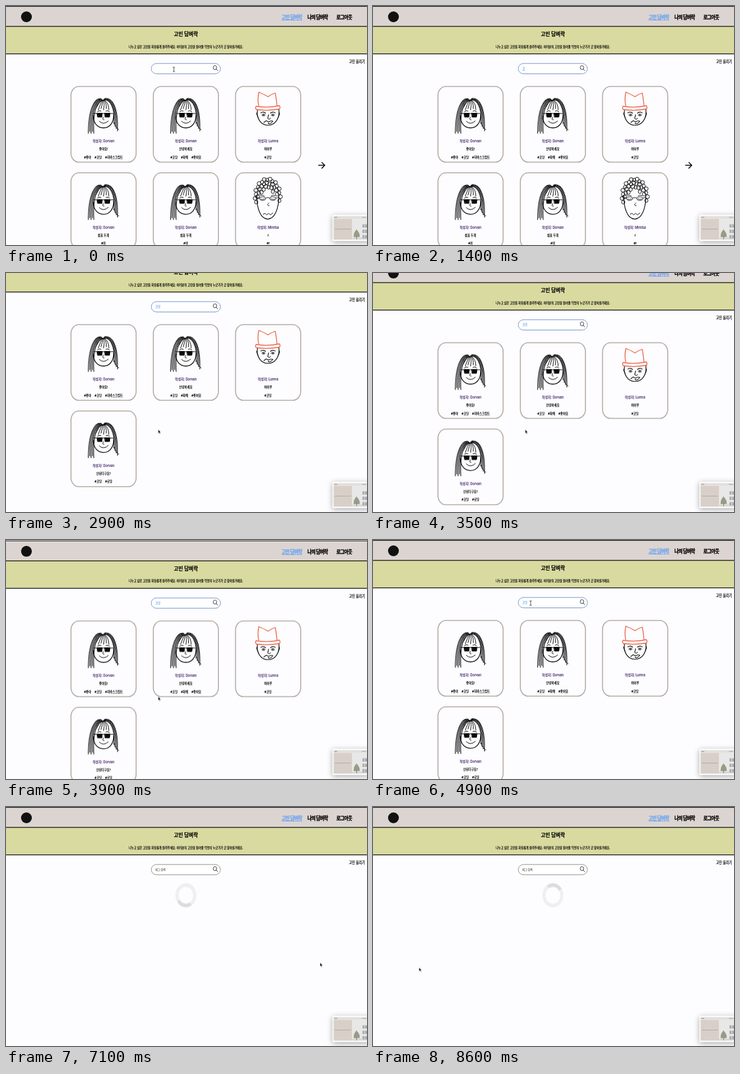
Recreate the animation shown at these times as an HTML page. Size 600 px wide and 398 px high, loop 8700 ms.

```html
<!DOCTYPE html>
<html lang="ko">
<head>
<meta charset="utf-8">
<title>고민 담벼락</title>
<style>
  html, body { margin: 0; width: 600px; height: 398px; overflow: hidden; background: #fdfcfe; }
  svg { display: block; }
  text { font-family: "Noto Sans", "Noto Sans CJK KR", sans-serif; font-weight: 500; white-space: pre; }
  .bold { font-weight: 700; }
  .heavy { font-weight: 900; letter-spacing: -0.8px; }
  .shadow { filter: drop-shadow(0 2px 5px #0005); }
</style>
</head>
<body>
<script>
const LOOP = 8700;
const SQUEEZE = 0.87; // the page is shown narrower than it was laid out
const COLS = [108, 244.8, 381.5];
const INK = '#0b0b0b';

function add(parent, tag, attrs = {}) {
  const el = document.createElementNS('http://www.w3.org/2000/svg', tag);
  for (const key in attrs) el.setAttribute(key, attrs[key]);
  parent.append(el);
  return el;
}
const group = (parent, x = 0, y = 0) => add(parent, 'g', { transform: `translate(${x} ${y})` });
const rect = (parent, x, y, width, height, fill, attrs) =>
  add(parent, 'rect', { x, y, width, height, fill, ...attrs });
const line = (parent, d, width = 1.1, stroke = INK, fill = 'none') =>
  add(parent, 'path', { d, stroke, fill, 'stroke-width': width, 'stroke-linecap': 'round', 'stroke-linejoin': 'round' });
const oval = (parent, cx, cy, rx, ry, attrs) =>
  add(parent, 'ellipse', { cx, cy, rx, ry, ...attrs });
const loop = (parent, cx, cy, rx, ry, width = 0.9, fill = 'none') =>
  oval(parent, cx, cy, rx, ry, { fill, stroke: INK, 'stroke-width': width });

// A hairline stroke gives the medium weight of the page font.
function text(parent, x, y, str, size, attrs = {}) {
  const el = add(parent, 'text', {
    transform: `translate(${x} ${y}) scale(${SQUEEZE} 1)`, 'font-size': size,
    stroke: attrs.fill || '#000', 'stroke-width': 0.18, ...attrs });
  el.textContent = str;
  return el;
}

function play(el, frames) {
  el.animate(frames, { duration: LOOP, iterations: Infinity });
}
function show(el, ...spans) {
  const frames = [{ offset: 0, opacity: 0 }];
  for (const [from, to] of spans) {
    frames.push({ offset: from / LOOP, opacity: 1 }, { offset: to / LOOP, opacity: 0 });
  }
  frames.push({ offset: 1, opacity: 0 });
  play(el, frames.map(f => ({ ...f, easing: 'step-end' })));
}
function move(el, steps, easing = 'linear') {
  play(el, steps.map(([time, x, y]) => (
    { offset: time / LOOP, transform: `translate(${x}px, ${y}px)`, easing })));
}

function longHair(g) {
  for (let i = 0; i < 5; i++) {
    line(g, `M${54 - i} ${24 - i * 0.9} C${45 - i * 1.5} ${21 - i * 0.7} ${36 - i * 1.8} 38
      ${38 - i * 2.3} ${78 - (i % 2) * 3}`);
  }
  for (let i = 0; i < 4; i++) {
    line(g, `M${53 + i} ${23 - i} C${64 + i * 1.5} ${20 - i * 0.7} ${74 + i * 1.6} 34
      ${71 + i * 2.1} ${62 + i * 4}`);
  }
  for (let i = 0; i < 6; i++) {
    line(g, `M${51 + i} 23 Q${46 + i * 3.4} 28 ${41 + i * 4.4} ${37 + (i % 2) * 2}`, 1);
  }
  line(g, 'M37 48 C37 61 44 69 54 69 S71 61 71 47', 1.3);
  line(g, 'M37 45 H71 M44 42 Q47 39 50 41 M58 41 Q61 39 64 42', 1);
  line(g, 'M43.5 44.5 H52 L51.5 51 H44.5Z M56 44.5 H65 L64 51 H57Z', 1, INK, INK);
  line(g, 'M54 51 Q51 56 55 55.5 M47 58 Q54 65 62 57.5 M72 60 Q74 69 79.5 72', 1);
}

function hatted(g) {
  line(g, 'M36.5 38 C34 53 42 64.5 54 64.5 S74 53 72 38', 1.2);
  line(g, 'M36 43 Q33 44 37.5 51 M72 43 Q75 44 71 51', 1);
  line(g, 'M42 44 Q46 41 50 44.5 M58 44.5 Q62 41 66 44 M55 47 L53.5 53 Q56 56 58 53 M47 60 L51 57 L55 59 Q59 56 62 58 Q57 64 54 61', 1.1);
  for (const x of [46.5, 62]) {
    loop(g, x, 47.5, 2.7, 1.5, 0.9, '#fff');
    loop(g, x, 47.5, 0.7, 0.8, 0.6, INK);
  }
  const red = '#ea5f42';
  line(g, 'M38.5 32 C37 25 37.5 15 38.8 9.5 Q45 12 54 17 Q59 13 66 11 C67.5 18 68 25 69 32', 1.3, red, '#fdfcfe');
  line(g, 'M34 33 Q54 36 73 32 Q75 35 73 37.5 Q54 41 35 38.5 Q32 36 34 33Z', 1.3, red, '#fdfcfe');
}

function curly(g) {
  line(g, 'M35.5 38 C35 60 42 77 53.5 77 S72 60 72 38', 1.2);
  for (const [rx, ry, from, to] of [[20.5, 29, 162, 378], [16, 23, 180, 360], [11, 17, 205, 335]]) {
    for (let deg = from; deg <= to; deg += 270 / rx) {
      const a = deg * Math.PI / 180;
      const wobble = Math.sin(deg * 5);
      loop(g, 53.5 + (rx + wobble) * Math.cos(a), 40 + (ry + wobble) * Math.sin(a),
        2.9 + wobble * 0.4, 3.1, 1);
    }
  }
  for (const x of [45, 62]) loop(g, x, 43, 5, 3.1);
  line(g, 'M36 41 L40 42 M50 42 Q53.5 40 57 42 M67 42 L71 41 M41 38 Q45 36 48 38.5 M59 38.5 Q62 36 66 38', 0.9);
  line(g, 'M42 44 Q45 45 48 43.5 M59 43.5 Q62 45 65 44 M55.5 50 Q50.5 54 56 55', 0.9);
  line(g, 'M46 69 L49 67.5 L52 70 L55 67.5 L58 70 L62 67', 1);
}

const PEOPLE = { Dorvan: longHair, Lumra: hatted, Mirelsa: curly };

function card(parent, index, [name, title, ...tags]) {
  const g = group(parent, COLS[index % 3], 134 + 143.8 * Math.floor(index / 3));
  rect(g, 0, 0, 108.3, 126, '#fdfcfe', { rx: 13, ry: 15, stroke: '#b4aaa2', 'stroke-width': 1.6 });
  PEOPLE[name](g);
  const mid = { 'text-anchor': 'middle' };
  text(g, 54, 93, `작성자: ${name}`, 6.2, { ...mid, fill: '#42206b' });
  text(g, 54, 106.3, title, 5.5, mid);
  const row = text(g, 54, 119.5, '', 5.5, mid);
  tags.forEach((tag, i) => {
    add(row, 'tspan', { dx: i ? 6.5 : 0 }).textContent = '#' + tag;
  });
}

function deck(parent, cards) {
  const g = group(parent);
  cards.forEach((c, i) => card(g, i, c));
  return g;
}

const svg = add(document.body, 'svg', { width: 600, height: 398, viewBox: '0 0 600 398' });
const page = add(svg, 'g');

// Header
rect(page, 0, 0, 600, 34, '#dcd4d1');
rect(page, 0, 0, 600, 1.2, '#111');
rect(page, 0, 34, 600, 45.5, '#d8da9f');
rect(page, 0, 33.3, 600, 1.3, '#111');
rect(page, 0, 79, 600, 1.3, '#111');
oval(page, 34, 18, 9, 9, { fill: '#111' });
const nav = { class: 'heavy', 'stroke-width': 0.3 };
text(page, 458, 22, '고민 담벼락', 9, { ...nav, fill: '#6fa4ee' });
rect(page, 458, 23, 34, 0.9, '#6fa4ee');
text(page, 501, 22, '나의 담벼락', 9, nav);
text(page, 549, 22, '로그아웃', 9, nav);
text(page, 299, 50, '고민 담벼락', 9.5, { 'text-anchor': 'middle', class: 'bold' });
text(page, 299, 69.7, '나누고 싶은 고민을 자유롭게 올려주세요. 여러분의 고민을 들어줄 익명의 누군가가 곧 찾아올거에요.',
  5.33, { 'text-anchor': 'middle' });
text(page, 570, 95.4, '고민 올리기', 6.3);

// Search box
const pill = stroke => rect(page, 241.5, 95.8, 114.8, 17, '#fff', { rx: 8.5, stroke, 'stroke-width': 1 });
pill('#958f85');
show(pill('#86abdc'), [0, 7000]);
loop(page, 347.3, 102.6, 2.9, 3.3, 0.8);
line(page, 'M349.4 105.1 L351.6 107.6', 0.9, '#222');
show(text(page, 248, 106, '태그 검색', 5, { fill: '#6d6d6d' }), [7000, LOOP]);
show(rect(page, 248.3, 101, 0.7, 6.5, '#7ea6da'), [400, 600], [5600, 5900], [6200, 6500]);
const TYPING = [
  ['ㅋ', 1100, 1300], ['코', 1300, 1500], ['콛', 1500, 1600], ['코디', 1600, 1700],
  ['코딩', 1700, 5000], ['코', 5000, 5300], ['ㅋ', 5300, 5600]];
for (const [str, from, to] of TYPING) {
  show(text(page, 248.3, 106, str, 5.2, { fill: '#78aae6' }), [from, to]);
}
show(rect(page, 248.3, 107.3, 4.4, 0.6, '#78aae6'), [1100, 1800]);

// Card lists
const hello = [
  ['Dorvan', '좋아요!', '좋아', '코딩', '자바스크립트'],
  ['Dorvan', '안녕하세요', '코딩', '화해', '좋아요'],
  ['Lumra', '하이루', '코딩']];
const comma = ['Dorvan', '쉼표 두개', '어'];
const letter = ['Mirelsa', 'f', 'f'];
const loading = ['Dorvan', '안된다구요?', '코딩', '로딩'];

const first = deck(page, [...hello, comma, comma, letter]);
line(first, 'M519.5 265.3 H529.5 M525 260.5 L529.8 265.3 L525 270.1', 1.5);
show(first, [0, 1800], [5600, 7000]);
show(deck(page, [...hello, loading]), [1800, 5600]);
const second = deck(page, [loading, comma, letter, comma]);
line(second, 'M78.5 265.3 H68.5 M73 260.5 L68.2 265.3 L73 270.1', 1.5);
show(second, [7200, 8600]);

// Spinner
const loader = group(page, 299, 147);
const ring = add(add(loader, 'g', { transform: `scale(${SQUEEZE} 1)` }), 'g');
oval(ring, 0, 0, 17, 17, { fill: 'none', stroke: '#efeef0', 'stroke-width': 6 });
add(ring, 'path', { d: 'M-12 -12 A17 17 0 0 1 12 -12', fill: 'none', stroke: '#dcdbdd', 'stroke-width': 6 });
const turn = time => `rotate(${12 + (time - 8600) * 0.36}deg)`;
play(ring, [{ transform: turn(0) }, { transform: turn(LOOP) }]);
show(loader, [7000, 7200], [8600, LOOP]);

move(page, [
  [0, 0, 0], [2400, 0, 0], [2600, 0, -28], [2800, 0, -46], [2900, 0, -48], [3200, 0, -48],
  [3500, 0, -18], [3700, 0, -3], [3900, 0, 0.8], [4100, 0, 0], [LOOP, 0, 0]]);

// Floating preview
const thumb = group(svg, 542.5, 347.5);
rect(thumb, 0, 0, 62, 44, '#fafafa', { rx: 1.5, class: 'shadow' });
rect(thumb, 2, 2.5, 58, 4.5, '#e3dfdd');
rect(thumb, 3, 4, 5, 1, '#8b8683');
rect(thumb, 49, 4, 7, 1, '#a5a09d');
rect(thumb, 2, 7, 31, 34.5, '#d9cfc9');
rect(thumb, 4, 23.5, 27, 0.8, '#aaa09a');
rect(thumb, 33, 7, 27, 34.5, '#e9e8e8');
rect(thumb, 33, 38, 27, 3.5, '#dad8d6');
line(thumb, 'M40 25 Q46 31 45 37 H35.5 Q35 30 40 25Z', 0.5, '#9a9b86', '#9a9b86');
rect(thumb, 39.8, 36, 0.9, 5, '#706a5c');
for (const y of [16, 25, 34]) {
  rect(thumb, 50, y, 3.3, 5.5, '#a7abad');
  rect(thumb, 54.3, y, 3.3, 5.5, '#a7abad');
}

// Mouse
const mouse = add(svg, 'g');
const arrow = line(mouse, 'M0 0 V6.8 L1.5 5.5 L2.5 8 L3.5 7.5 L2.5 5.2 H4.4Z', 0.6, '#fff', '#111');
const beam = line(mouse, 'M-1.4 -3.7 Q0 -3.7 0 -2.8 Q0 -3.7 1.4 -3.7 M0 -2.8 V3.2 M-1.4 4 Q0 4 0 3 Q0 4 1.4 4', 0.8, '#222');
show(arrow, [2000, 4500], [6600, LOOP]);
show(beam, [0, 600], [4500, 5000], [6500, 6600]);
move(mouse, [
  [0, 279, 105.5], [2000, 279, 105.5], [2400, 253, 260.5], [4200, 253, 260.5], [4600, 262, 105],
  [6500, 262, 105], [6900, 522, 259], [7400, 522, 259], [7850, 300, 330], [8300, 76.5, 267], [LOOP, 76.5, 267]],
  'ease-in-out');
</script>
</body>
</html>
```
